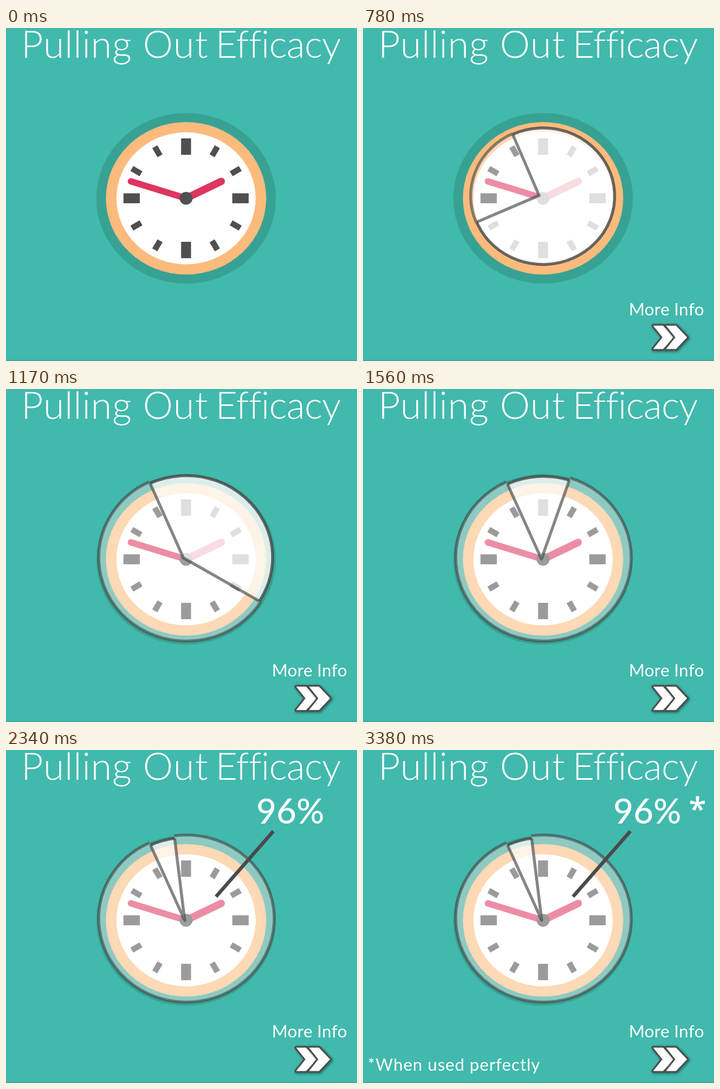
An HTML page with a canvas for the animation above (7.02 s loop, 600 by 570 pixels).

```html
<!DOCTYPE html>
<html lang="en">
<head>
<meta charset="utf-8">
<title>Clock chart</title>
<style>
  html, body { margin: 0; width: 100%; height: 100%; overflow: hidden; background: #41b9ad; }
  canvas { display: block; }
</style>
</head>
<body>
<canvas id="stage" width="600" height="570"></canvas>
<script>
const ctx = document.getElementById('stage').getContext('2d');
const LOOP = 7020, STEP = 130;
const DARK = '#4f4f4f', PINK = '#dd3660';
const CX = 307.8, CY = 291.5;

const clamp = v => Math.min(1, Math.max(0, v));
const mix = (a, b, k) => a + (b - a) * k;
const progress = (t, start, length) => clamp((t - start) / length);
const smooth = x => x * x * (3 - 2 * x);

function oval(rx, ry, color) {
  ctx.fillStyle = color;
  ctx.beginPath();
  ctx.ellipse(CX, CY, rx, ry, 0, 0, 2 * Math.PI);
  ctx.fill();
}

function line(x1, y1, x2, y2, width, color, cap = 'butt') {
  ctx.strokeStyle = color;
  ctx.lineWidth = width;
  ctx.lineCap = cap;
  ctx.beginPath();
  ctx.moveTo(x1, y1);
  ctx.lineTo(x2, y2);
  ctx.stroke();
}

function label(text, x, y, size, weight, spacing = 0, family = 'Lato') {
  ctx.font = `${weight} ${size}px ${family}, sans-serif`;
  ctx.letterSpacing = spacing + 'px';
  ctx.fillStyle = '#fff';
  ctx.fillText(text, x, y);
}

function drawTitle() {
  label('Pulling', 26, 51, 65, 300, 0.6);
  label('Out', 234, 51, 65, 300, 1.2);
  label('Efficacy', 358, 51, 65, 300, -0.8);
}

function drawTick(hour) {
  const a = hour * Math.PI / 6, big = hour % 3 === 0;
  const rx = big ? 93 : 98, ry = big ? 88.5 : 93;
  const w = big ? 17 : 10, h = big ? 28 : 18;
  ctx.save();
  ctx.translate(CX + rx * Math.sin(a), CY - ry * Math.cos(a));
  ctx.rotate(a);
  ctx.fillStyle = DARK;
  ctx.fillRect(-w / 2, -h / 2, w, h);
  ctx.restore();
}

function drawClock() {
  oval(153.5, 146, '#37a293');
  oval(137, 130.5, '#fbbb7d');
  oval(119, 113, '#fff');
  for (let hour = 0; hour < 12; hour++) drawTick(hour);
  line(213.5, 262.5, CX, CY, 11, PINK, 'round');
  line(368, 262.5, CX, CY, 12.5, PINK, 'round');
  oval(11, 11, '#505050');
}

function drawPie(t) {
  const size = smooth(progress(t, 260, 710));
  if (size === 0) return;
  const sweep = smooth(progress(t, 268, 1552));
  const x = mix(303.5, 308.5, size), y = mix(284.5, 288.5, size);
  const hubX = mix(299.5, 305.5, sweep), hubY = mix(285, 291.5, sweep);
  const rx = 150 * size, ry = 143 * size;
  const shrink = 1 - 0.03 * sweep;
  const rad = deg => (deg - 90) * Math.PI / 180;
  const first = rad(-25), edge = rad(335 - 343 * sweep), last = rad(335);

  function slice(from, to, scale, fillAlpha, lineAlpha) {
    ctx.fillStyle = `rgba(255,255,255,${fillAlpha})`;
    ctx.beginPath();
    ctx.moveTo(hubX, hubY);
    ctx.ellipse(x, y, rx * scale, ry * scale, 0, from, to);
    ctx.closePath();
    ctx.fill();
    ctx.strokeStyle = `rgba(70,70,70,${lineAlpha})`;
    ctx.beginPath();
    ctx.ellipse(x, y, rx * scale, ry * scale, 0, from, to);
    ctx.stroke();
  }
  const rim = a => [x + rx * shrink * Math.cos(a), y + ry * shrink * Math.sin(a)];

  ctx.lineWidth = 5;
  ctx.lineCap = 'butt';
  ctx.lineJoin = 'round';
  slice(first, edge, shrink, 0.82, 0.8);
  slice(edge, last, 1, 0.43, 0.62);
  ctx.strokeStyle = 'rgba(70,70,70,0.66)';
  ctx.beginPath();
  ctx.moveTo(...rim(first));
  ctx.lineTo(hubX, hubY);
  ctx.lineTo(...rim(edge));
  ctx.stroke();
}

function chevron(x) {
  ctx.beginPath();
  [[0, -20], [17, -20], [36, 0], [17, 20], [0, 20], [16, 0]]
    .forEach(([px, py]) => ctx.lineTo(x + px, py));
  ctx.closePath();
  ctx.strokeStyle = '#4a4f4f';
  ctx.lineWidth = 6;
  ctx.lineJoin = 'round';
  ctx.shadowColor = 'rgba(0,0,0,0.45)';
  ctx.shadowBlur = 4;
  ctx.shadowOffsetX = ctx.shadowOffsetY = 1.5;
  ctx.stroke();
  ctx.shadowColor = 'transparent';
  ctx.fillStyle = '#fff';
  ctx.fill();
}

function drawMoreInfo(t) {
  // grows evenly, overshoots once, then settles
  const size = t < 650 ? t / 546 : mix(1.047, 1, progress(t, 650, 130));
  if (size === 0) return;
  ctx.save();
  ctx.translate(455, 483);
  ctx.scale(size, size);
  label('More Info', -0.5, 9, 29, 400, 0.35);
  ctx.restore();
  ctx.save();
  ctx.translate(525, 529.5);
  ctx.scale(size, size);
  chevron(-29);
  chevron(-7);
  ctx.restore();
}

function drawResult(t) {
  const reach = progress(t, 1690, 390);
  if (reach > 0) {
    line(359, 251, mix(359, 457, reach), mix(251, 139, reach), 6, '#4a4a4c');
  }
  ctx.globalAlpha = progress(t, 1950, 390);
  label('96%', 428, 126, 59, 500);
  ctx.globalAlpha = 1;
  if (t >= 2860) label('*', 557, 120, 54, 600, 0, 'Open Sans');
  if (t >= 3380) label('*When used perfectly', 8, 549, 29, 400, 0.85);
}

function draw(t) {
  ctx.fillStyle = '#41b9ad';
  ctx.fillRect(0, 0, 600, 570);
  ctx.fillStyle = 'rgba(0,0,0,0.08)';
  ctx.fillRect(0, 568, 600, 2);
  drawTitle();
  drawClock();
  drawPie(t);
  drawMoreInfo(t);
  drawResult(t);
}

const begin = performance.now();
function tick() {
  const t = (performance.now() - begin) % LOOP;
  draw(Math.floor(t / STEP) * STEP);
  requestAnimationFrame(tick);
}
tick();
</script>
</body>
</html>
```
